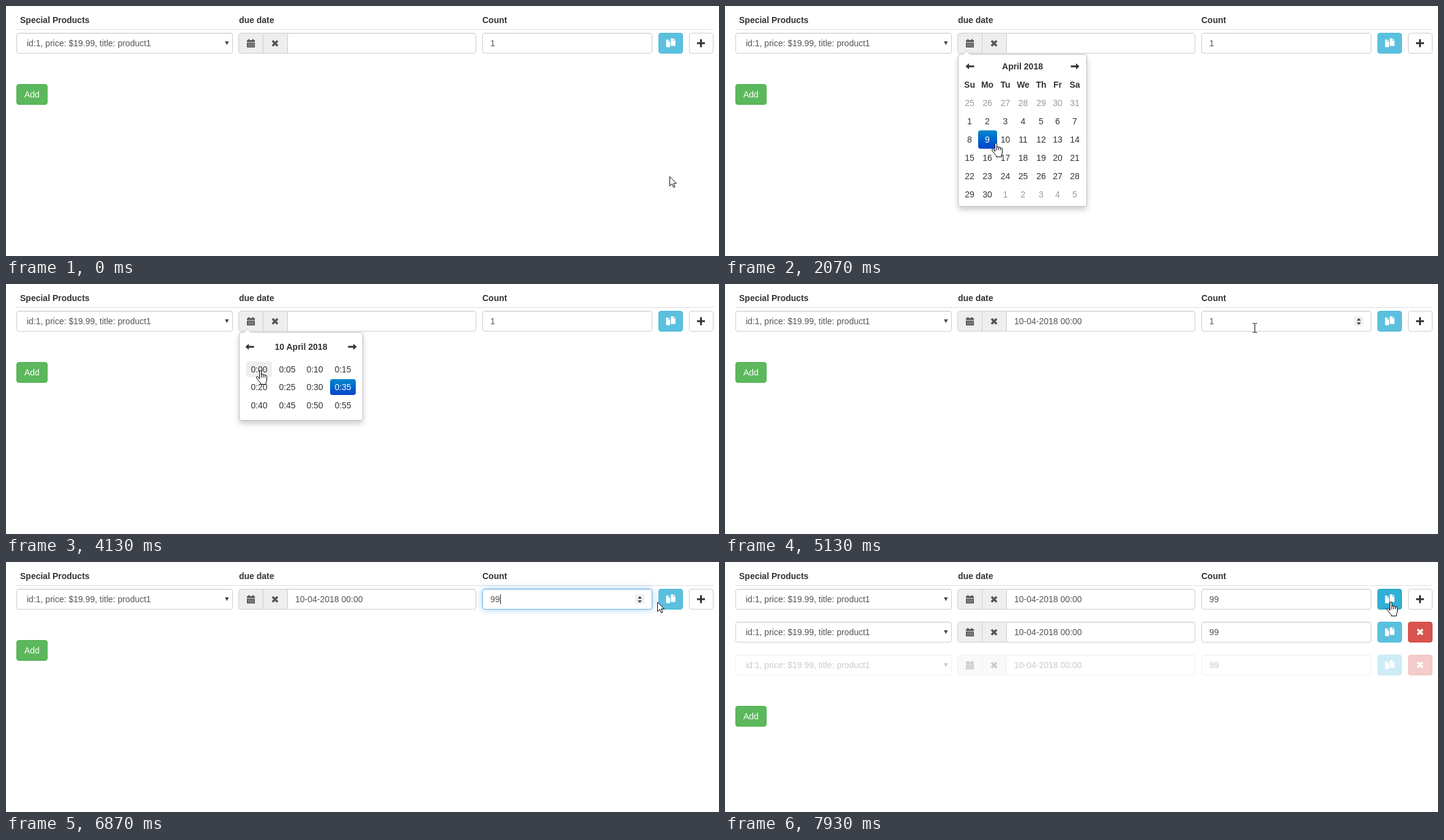
Write an HTML page that moves like this. It is 1166 by 410 pixels and loops after 8000 ms.

```html
<!DOCTYPE html>
<html lang="en">
<head>
<meta charset="utf-8">
<title>Product form</title>
<style>
html, body { margin: 0; width: 100%; height: 100%; overflow: hidden; background: #fff; }
svg { display: block; width: 1166px; height: 410px; font: 14px "Liberation Sans", Arial, sans-serif; }
text { fill: #333; white-space: pre; }
.b { font-weight: bold; }
.m { text-anchor: middle; }
.in { fill: #555; }
.old { fill: #999; }
.on { fill: #fff; }
.box { fill: #fff; stroke: #ccc; }
.addon { fill: #eee; stroke: #ccc; }
.panel { filter: drop-shadow(0 5px 5px rgba(0,0,0,.2)); }
</style>
</head>
<body>
<svg id="stage" viewBox="0 0 1166 410"></svg>
<script>
const LOOP = 8000, STEP = 200 / 3, PITCH = 54;
const stage = document.getElementById('stage');
const $ = id => document.getElementById(id);

// ---- markup helpers ----
const text = (x, y, s, cls = '', extra = '') => `<text x="${x}" y="${y}" class="${cls}" ${extra}>${s}</text>`;
const rect = (x, y, w, h, attrs, r = 3.5) =>
  `<rect x="${x + .5}" y="${y + .5}" width="${w - 1}" height="${h - 1}" rx="${r}" ${attrs}/>`;
const fillRect = (x, y, w, h, attrs) => `<rect x="${x}" y="${y}" width="${w}" height="${h}" rx="4" ${attrs}/>`;
const glyph = (x, y, d, attrs) => `<path transform="translate(${x} ${y})" d="${d}" ${attrs}/>`;
const stroke = (color, w) => `fill="none" stroke="${color}" stroke-width="${w}"`;

const CROSS = 'M-4.2-4.2L4.2 4.2M4.2-4.2L-4.2 4.2';
const PLUS = 'M-6.5 0H6.5M0-6.5V6.5';
const COPY = 'M-7.5-5.5h3.5v3.5h3v9h-6.5zM-3.2-5.5l2.4 2.6h-2.4zM.2-7.5h4v3.7h3.6v8.8h-7.6zM5-7.5l2.8 2.9H5z';
const LEFT = 'M-7 0L-1.5-5V-1.5H7V1.5H-1.5V5Z';
const RIGHT = 'M7 0L1.5-5V-1.5H-7V1.5H1.5V5Z';

function calendarIcon() {
  return '<path d="M394 56h2v-1.5h2.5v1.5h4v-1.5h2.5v1.5h2v3h-13zM394 60h13v8h-13z" fill="#555"/>' +
    `<path d="M396 62.5h9.5M396 65.5h9.5" ${stroke('#eee', 1)} stroke-dasharray="1.6 1"/>`;
}

function row(i) {
  const first = i === 0;
  const inset = (x, w) => `<path d="M${x + 3} 45.5H${x + w - 3}" ${stroke('#000', 1)} opacity=".06"/>`;
  return `<g id="row${i}" transform="translate(0 ${PITCH * i})">` +
    rect(17, 44, 354, 34, 'class="box"') + inset(17, 354) +
    text(34, 66, 'id:1, price: $19.99, title: product1', 'in') +
    '<path d="M358 58h6.4l-3.2 6z" fill="#444"/>' +
    '<path class="addon" d="M420.500 44.500H385a4 4 0 0 0-4 4l-.5 0V73.500a4 4 0 0 0 4 4H420.500z"/>' +
    '<path class="addon" d="M420.5 44.5H460.5V77.5H420.5z"/>' +
    calendarIcon() + glyph(440, 61.3, CROSS, stroke('#555', 3.5)) +
    '<path class="box" d="M460.5 44.5H765a3.500 3.500 0 0 1 3.500 3.500V74a3.500 3.500 0 0 1-3.500 3.500H460.500z"/>' + inset(460, 309) +
    text(473, 66, '10-04-2018 00:00', 'in', `id="date${i}"`) +
    rect(779, 44, 278, 34, `class="box" id="field${i}"`) + inset(779, 278) +
    (first ? '<rect id="mark" x="792" y="53" width="8" height="16" fill="#3390ff"/>' : '') +
    text(792, 66, '99', 'in', `id="count${i}"`) +
    (first ? '<path id="caret" d="M808.5 53V69" stroke="#222"/>' +
      '<g id="spin"><rect x="1029" y="53" width="15" height="16" fill="#f0f0f0"/>' +
      '<path d="M1033 60h7l-3.5-4zM1033 63h7l-3.5 4z" fill="#444"/></g>' : '') +
    rect(1067, 44, 40, 34, `id="copy${i}" fill="#5bc0de" stroke="#46b8da"`) +
    glyph(1087, 60.5, COPY, 'fill="#fff"') +
    rect(1117, 44, 40, 34, first ? 'class="box"' : 'fill="#d9534f" stroke="#d43f3a"') +
    (first ? glyph(1136.5, 61, PLUS, stroke('#333', 3)) : glyph(1136.8, 60.8, CROSS, stroke('#fff', 3.5))) +
    '</g>';
}

// ---- date and time popups ----
const dayX = [400, 429, 458.5, 487.5, 517, 544, 572];
const dayEdge = [386, 414, 445, 473, 502, 531, 558, 588];
const slotX = c => Math.round(393 + 45.7 * c);
const slotY = r => Math.round(126.8 + 29.6 * r);

function popup(id, w, h, title, y, inset, body) {
  const mid = 381 + w / 2;
  return `<g id="${id}">` + rect(381, 79, w, h, 'class="panel" fill="#fff" stroke="#bfbfbf"') +
    '<path d="M388 80l7-7 7 7z" fill="#ccc"/><path d="M389 80.500l6-6.500 6 6.500z" fill="#fff"/>' +
    text(mid, y + 5, title, 'b m') +
    glyph(381 + inset, y, LEFT, 'fill="#333"') + glyph(381 + w - inset, y, RIGHT, 'fill="#333"') +
    fillRect(0, 0, 0, 0, `id="${id}Hover" fill="#eee"`) + body + '</g>';
}

function monthBody() {
  let s = fillRect(414, 204, 31, 30, 'fill="url(#blue)"');
  ['Su', 'Mo', 'Tu', 'We', 'Th', 'Fr', 'Sa'].forEach((d, c) => s += text(dayX[c], 134, d, 'b m'));
  for (let i = 0; i < 42; i++) {
    const n = i - 6;
    const day = n < 1 ? n + 31 : n > 30 ? n - 30 : n;
    const cls = n < 1 || n > 30 ? 'old' : n === 9 ? 'on' : '';
    s += text(dayX[i % 7], 164 + 30 * Math.floor(i / 7), day, 'm ' + cls);
  }
  return s;
}

function slots(count, active, label) {
  let s = '';
  for (let i = 0; i < count; i++) {
    const x = slotX(i % 4), y = slotY(Math.floor(i / 4));
    if (i === active) s += fillRect(x, y, 42, 26, 'fill="url(#blue)"');
    s += text(x + 21, y + 18, label(i), 'm ' + (i === active ? 'on' : ''));
  }
  return s;
}

const DAY = '10 April 2018';
const minute = i => '0:' + String(i * 5).padStart(2, '0');

stage.innerHTML =
  '<defs><linearGradient id="blue" x2="0" y2="1"><stop stop-color="#08c"/><stop offset="1" stop-color="#04c"/></linearGradient></defs>' +
  text(23, 28, 'Special Products', 'b') + text(381, 28, 'due date', 'b') + text(779, 28, 'Count', 'b') +
  '<path d="M17 38.5H1157" stroke="#ddd"/>' +
  row(0) + row(1) + row(2) +
  '<g id="add">' + rect(17, 128, 51, 34, 'fill="#5cb85c" stroke="#4cae4c"') + text(30, 150, 'Add', 'on') + '</g>' +
  popup('month', 211, 250, 'April 2018', 99, 19.5, monthBody()) +
  popup('hours', 203, 234, DAY, 103, 17.5, slots(24, 16, i => i + ':00')) +
  popup('minutes', 203, 145, DAY, 103, 17.5, slots(12, 7, minute)) +
  '<g id="cursor">' +
  '<path id="arrow" d="M.5.8V16.200L4.200 12.700L6.800 18.400L9 17.400L6.500 11.900H11.300Z" fill="#fff" stroke="#000"/>' +
  '<path id="beam" d="M-3.500-7.500H-1L0-7 1-7.500H3.500M0-7V7M-3.500 7.500H-1L0 7 1 7.500H3.500" fill="none" stroke="#000"/>' +
  '<path id="hand" transform="translate(-6 0)" d="M5.500 14.500V2.200Q5.500.5 7 .5T8.500 2.200V8Q8.500 6.800 10 6.800T11.500 8.400Q11.500 7.600 13 7.600T14.500 9.300Q14.500 8.800 16 8.800T17.500 10.500V16Q17.500 18 16.200 20V23.500H7.500V21.500L2 15Q.5 13 .5 12 .7 10.500 2.200 10.800 3.500 11 5.500 14.500ZM8.500 8v4.500M11.500 8.500v4M14.500 9.500v3" fill="#fff" stroke="#000"/>' +
  '</g>';

// ---- motion: begin, end, x, y of the pointer ----
const moves = [
  [0, 533, 427, 60], [533, 600, 433, 63], [733, 867, 413, 55], [1067, 1133, 412, 55],
  [1267, 1733, 459, 228], [1800, 2133, 440, 223], [2267, 2667, 461, 219],
  [3267, 3533, 418, 145], [3600, 3667, 417, 144], [4067, 4133, 415, 141],
  [4267, 5133, 867, 72], [5267, 5333, 867, 71], [5467, 5667, 731, 57],
  [5800, 5867, 729, 56], [5867, 6000, 745, 99], [6133, 6333, 769, 105],
  [6400, 6600, 753, 100], [6600, 6867, 1065, 65], [6867, 7133, 1088, 65]
];
const clamp = v => Math.max(0, Math.min(1, v));

function pointer(t) {
  let x = 1085, y = 279;
  for (const [a, b, tx, ty] of moves) {
    const p = clamp((t - a) / (b - a)), e = p * p * (3 - 2 * p);
    x += (tx - x) * e;
    y += (ty - y) * e;
    if (p < 1) break;
  }
  return [Math.round(x), Math.round(y)];
}

const show = (id, on) => $(id).setAttribute('visibility', on ? 'visible' : 'hidden');
const set = (id, attrs) => { for (const k in attrs) $(id).setAttribute(k, attrs[k]); };
const inside = (x, y, x0, y0, x1, y1) => x >= x0 && x < x1 && y >= y0 && y < y1;

function hoverCell(open, x, y) {
  if (open === 'month') {
    const c = dayEdge.findIndex((e, i) => x >= e && x < dayEdge[i + 1]);
    const r = Math.floor((y - 144) / 30);
    if (c < 0 || r < 0 || r > 5) return null;
    return [dayEdge[c], 144 + 30 * r, dayEdge[c + 1] - dayEdge[c], 30];
  }
  for (let i = 0; i < (open === 'hours' ? 24 : 12); i++) {
    const sx = slotX(i % 4), sy = slotY(Math.floor(i / 4));
    if (inside(x, y, sx, sy, sx + 42, sy + 26)) return [sx, sy, 42, 26];
  }
  return null;
}

function draw(ms) {
  const t = Math.floor((ms + 4) / STEP) * STEP;
  const [x, y] = pointer(t);
  const open = t < 1250 || t > 4300 ? '' : t < 3050 ? 'month' : t < 3850 ? 'hours' : 'minutes';
  const fresh = inside(t, 0, 3050, 0, 3100, 1) || inside(t, 0, 3850, 0, 3900, 1);

  for (const id of ['month', 'hours', 'minutes']) {
    const cell = id === open && !fresh ? hoverCell(id, x, y) : null;
    $(id).style.display = id === open ? '' : 'none';
    const [cx, cy, w, h] = cell || [0, 0, 0, 0];
    set(id + 'Hover', { x: cx, y: cy, width: w, height: h });
  }

  const inPopup = open && inside(x, y, 381, 82, open === 'month' ? 592 : 584, 329);
  const overCount = inside(x, y, 779, 44, 1057, 78);
  const overCopy = inside(x, y, 1067, 44, 1107, 78);
  const overText = !inPopup && (inside(x, y, 461, 44, 769, 78) || (overCount && x < 1028));
  const kind = inPopup || overCopy ? 'hand' : overText ? 'beam' : 'arrow';
  for (const id of ['arrow', 'beam', 'hand']) show(id, id === kind);
  set('cursor', { transform: `translate(${kind === 'beam' ? x - .5 : x} ${y})` });

  const glow = clamp((t - 5460) / 150) * (1 - clamp((t - 7210) / 150));
  const field = $('field0').style;
  const mix = (a, b) => Math.round(a + (b - a) * glow);
  field.stroke = `rgb(${mix(204, 102)},${mix(204, 175)},${mix(204, 233)})`;
  field.filter = glow ? `drop-shadow(0 0 6px rgba(102,175,233,${.6 * glow}))` : 'none';

  const marked = t > 5580 && t < 6450;
  show('date0', t > 4300);
  show('mark', marked);
  show('caret', t > 6580 && t < 7100);
  show('spin', overCount || (t > 5500 && t < 7250));
  $('count0').textContent = t < 6450 ? '1' : t < 6580 ? '9' : '99';
  $('count0').style.fill = marked ? '#fff' : '#555';
  set('copy0', overCopy ? { fill: '#31b0d5', stroke: '#269abc' } : { fill: '#5bc0de', stroke: '#46b8da' });

  // cloned rows fade in below while the Add button drops
  const born = [7320, 7785];
  born.forEach((b, i) => set('row' + (i + 1), { opacity: clamp((t - b) / 500) }));
  set('add', { transform: `translate(0 ${PITCH * born.filter(b => t >= b).length})` });
}

function tick(now) {
  draw(now % LOOP);
  requestAnimationFrame(tick);
}
draw(0);
requestAnimationFrame(tick);
</script>
</body>
</html>
```
